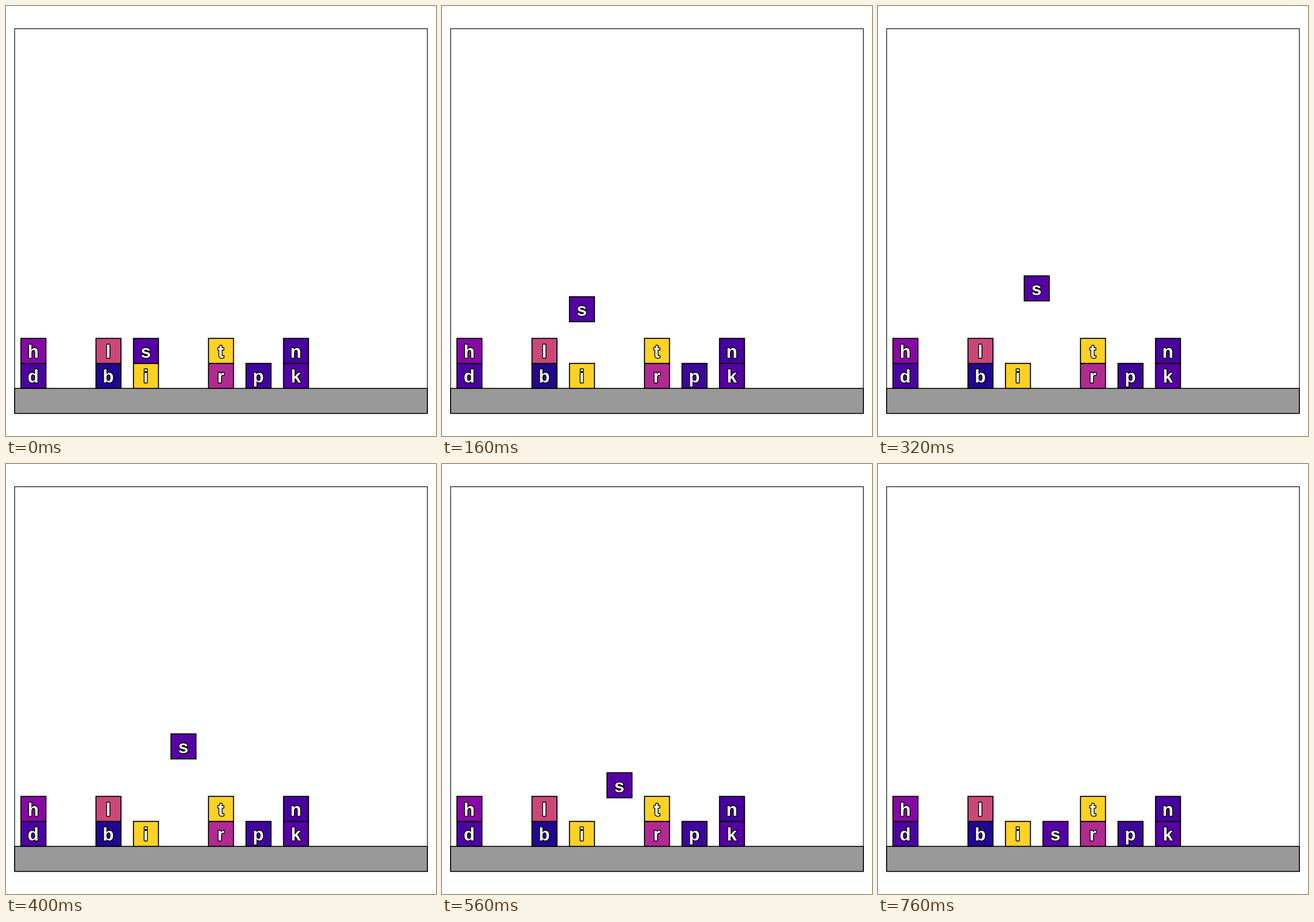
Animation, 748 px wide and 748 px high, one loop 800 ms. Source, as an HTML page:

```html
<!DOCTYPE html>
<html lang="en">
<head>
<meta charset="utf-8">
<title>Block stacking</title>
<style>
  html, body { margin: 0; width: 100%; height: 100%; overflow: hidden; background: #fff; }
  svg { display: block; width: 100vw; height: 100vh; }
  rect { stroke: #000; }
  text {
    font: bold 31.5px "Liberation Sans", Arial, sans-serif;
    text-anchor: middle;
    fill: #fff;
    stroke: #000;
    stroke-width: 2.8px;
    stroke-linejoin: round;
    paint-order: stroke;
  }
</style>
</head>
<body>
<svg id="stage" viewBox="0 0 748 748">
  <rect x="15" y="39.5" width="718" height="669" fill="none" stroke-width="1.2"/>
  <rect x="15" y="665.2" width="718" height="43.5" fill="#999" stroke-width="1.6"/>
</svg>
<script>
const SIZE = 43.5, PITCH = 1.5 * SIZE, LEFT = 26, FLOOR = 665.2;
const STEP = 40, LOOP = 800;
const stage = document.getElementById('stage');

// letter, column, level, colour
const blocks = [
  ['d', 0, 0, '#4c02a1'], ['h', 0, 1, '#8808a6'],
  ['b', 2, 0, '#220690'], ['l', 2, 1, '#cc4778'],
  ['i', 3, 0, '#fcd225'],
  ['r', 5, 0, '#b12a90'], ['t', 5, 1, '#fcd225'],
  ['p', 6, 0, '#3e049c'],
  ['k', 7, 0, '#5601a4'], ['n', 7, 1, '#46039f'],
  ['s', 3, 1, '#5601a4']
];

// time, column, level of the moving block
const route = [[0, 3, 1], [240, 3, 3.5], [400, 4, 3.5], [760, 4, 0]];

function add(parent, tag, attrs) {
  const el = document.createElementNS('http://www.w3.org/2000/svg', tag);
  for (const key in attrs) el.setAttribute(key, attrs[key]);
  return parent.appendChild(el);
}

function place(el, col, level) {
  el.setAttribute('transform',
    `translate(${LEFT + col * PITCH} ${FLOOR - (level + 1) * SIZE})`);
}

function makeBlock([letter, col, level, fill]) {
  const g = add(stage, 'g', {});
  add(g, 'rect', { width: SIZE, height: SIZE, fill, 'stroke-width': 1.8 });
  add(g, 'text', { x: SIZE / 2 - 0.3, y: 33.6 }).textContent = letter;
  place(g, col, level);
  return g;
}

const mover = blocks.map(makeBlock).pop();

function draw(now) {
  const t = Math.floor((now % LOOP) / STEP) * STEP;
  const i = Math.max(1, route.findIndex(p => p[0] >= t));
  const [t0, c0, l0] = route[i - 1], [t1, c1, l1] = route[i];
  const k = (t - t0) / (t1 - t0);
  place(mover, c0 + (c1 - c0) * k, l0 + (l1 - l0) * k);
}

let start;
function tick(now) {
  start ??= now;
  draw(now - start);
  requestAnimationFrame(tick);
}
draw(0);
requestAnimationFrame(tick);
</script>
</body>
</html>
```
